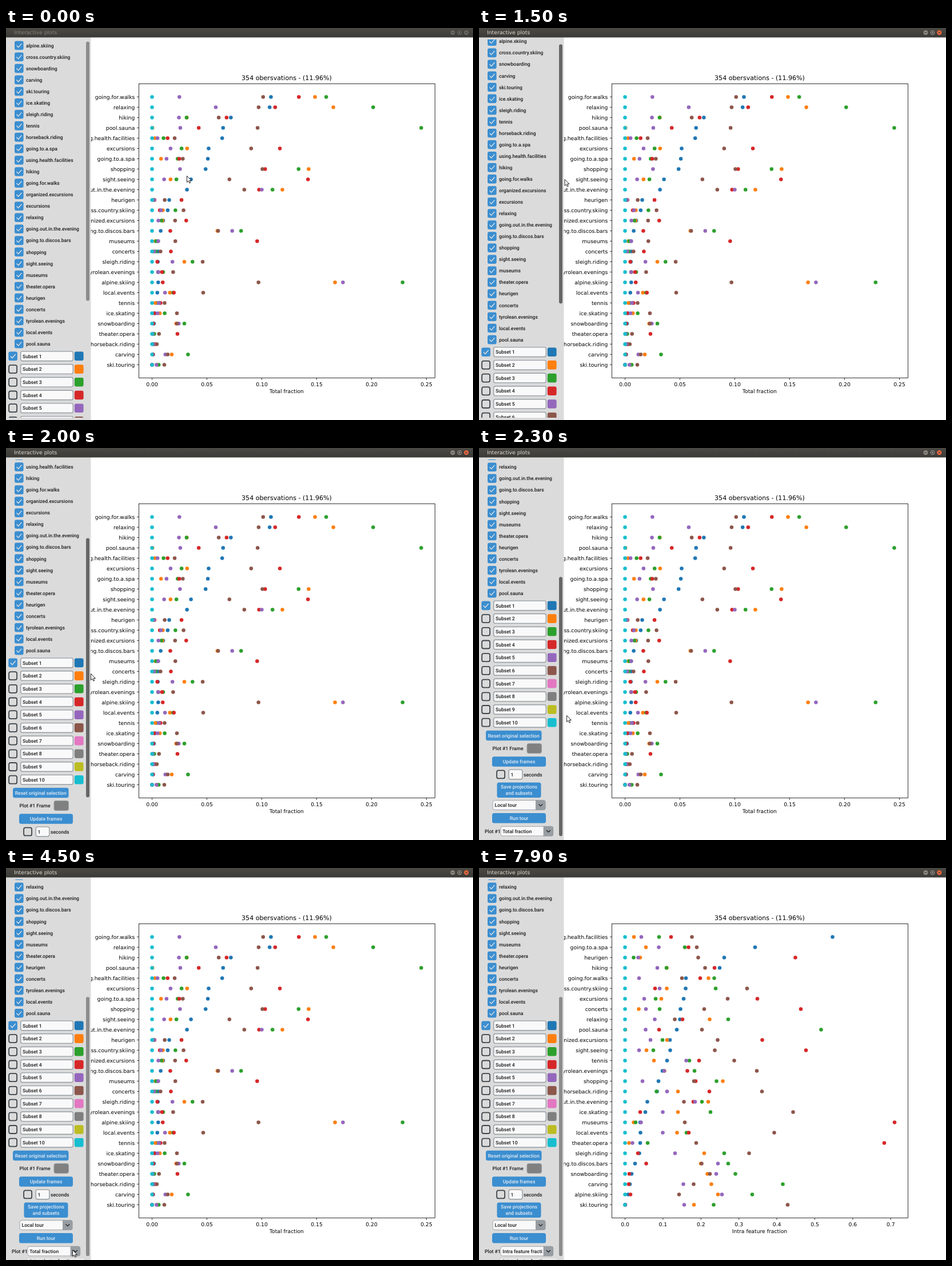
Animation of 817 by 685 pixels, one loop 8000 ms. Source, as an HTML page:

```html
<!DOCTYPE html>
<html lang="en">
<head>
<meta charset="utf-8">
<title>Interactive plots</title>
<style>
html, body { margin: 0; width: 100%; height: 100%; overflow: hidden; background: #fff; }
svg { display: block; width: 817px; height: 685px; text-rendering: geometricPrecision; }
.plot text, .title { font-family: "DejaVu Sans", sans-serif; font-size: 9.24px; }
.plot .head { font-size: 11.09px; }
.side text { font: 500 8.6px Roboto, sans-serif; fill: #1a1a1a; }
.side .light { fill: #e4ebf3; }
</style>
</head>
<body>
<svg id="stage" viewBox="0 0 817 685">
  <defs>
    <clipPath id="view"><rect x="0" y="20" width="148" height="661"/></clipPath>
    <clipPath id="field"><rect x="39" y="950" width="72" height="40"/></clipPath>
    <linearGradient id="bar" x2="0" y2="1"><stop stop-color="#4b4a45"/><stop offset="1" stop-color="#3b3a36"/></linearGradient>
  </defs>
  <rect width="817" height="685" fill="#fff"/>
  <g id="total" class="plot"></g>
  <g id="intra" class="plot"></g>
  <g class="side">
    <rect y="16" width="148.5" height="669" fill="#dbdbdb"/>
    <g clip-path="url(#view)"><g id="list"></g></g>
    <rect id="thumb" x="140" width="6" height="453" rx="3"/>
    <g id="menu">
      <rect x="36.5" y="681" width="101" height="6" fill="#e8e8e8" stroke="#c4c4c4" stroke-width=".6"/>
      <rect id="lit" x="37" y="682" width="100" height="3" fill="#bfbfbf"/>
      <text x="42" y="689.6">Intra cluster fraction</text>
    </g>
  </g>
  <g id="window">
    <rect width="817" height="16.5" fill="url(#bar)"/>
    <text id="caption" class="title" x="14" y="11.4">Interactive plots</text>
    <g id="buttons" stroke="#3b3a36">
      <circle cx="781.5" cy="8" r="4.6"/><path d="M779.3 8h4.4"/>
      <circle cx="793.5" cy="8" r="4.6"/><path d="M791.6 6.1h3.8v3.8h-3.8z" fill="none"/>
      <circle id="close" cx="805.3" cy="8" r="4.6"/><path d="M803.5 6.2l3.6 3.6m0-3.6l-3.6 3.6"/>
    </g>
  </g>
  <path id="cursor" d="M.5 .5V11.6L3.1 9.2L4.9 13.2L6.7 12.4L5 8.5H8.4z" fill="#fff" stroke="#111" stroke-width=".9"/>
</svg>
<script>
const $ = id => document.getElementById(id);
const BLUE = '#3b8ed0', GREY = '#979da2', DARK = '#3e454a', FIELD = '#f9f9fa';
const BLUE_HOVER = '#36719f', GREY_HOVER = '#6e7174';
const colors = ['#1f77b4', '#ff7f0e', '#2ca02c', '#d62728', '#9467bd', '#8c564b', '#e377c2', '#7f7f7f', '#bcbd22', '#17becf'];

function add(parent, tag, attrs, text) {
  const el = document.createElementNS('http://www.w3.org/2000/svg', tag);
  for (const k in attrs) el.setAttribute(k, attrs[k]);
  if (text) el.textContent = text;
  return parent.appendChild(el);
}

// Shares of subsets 2 to 6 per feature, in pixels; subset 1 takes the rest of UNIT.
const UNIT = 664, X0 = 255.5;
const shares = {
  'using.health.facilities': [15.5, 59.5, 80.5, 28.5, 117],
  'going.to.a.spa': [36.5, 104.5, 111, 59, 125.5],
  'heurigen': [26.5, 15, 298, 23, 128],
  'hiking': [73, 72.5, 156.5, 56.5, 140],
  'going.for.walks': [146, 156, 131.5, 24.5, 99.5],
  'cross.country.skiing': [73, 158.5, 52.5, 60.5, 213.5],
  'excursions': [63.5, 53.5, 231.5, 33.5, 179.5],
  'concerts': [24, 60.5, 307.5, 36.5, 138.5],
  'relaxing': [148, 180.5, 100.5, 52, 87],
  'pool.sauna': [.5, 343, 59.5, 36, 134.5],
  'organized.excursions': [73.5, 65.5, 240, 44.5, 162],
  'sight.seeing': [37.5, 49.5, 316.5, 24.5, 157],
  'tennis': [50.5, 112.5, 129.5, 107, 191],
  'tyrolean.evenings': [69, 121.5, 109, 68.5, 230.5],
  'shopping': [171, 160, 123.5, 30.5, 120.5],
  'horseback.riding': [92.5, 55, 147.5, 73.5, 239.5],
  'going.out.in.the.evening': [145.5, 134.5, 119.5, 122.5, 103],
  'ice.skating': [92.5, 149.5, 26.5, 66, 294],
  'museums': [15, 18.5, 471.5, 28, 104.5],
  'local.events': [91, 107.5, 111.5, 66, 261],
  'theater.opera': [7, 39.5, 453.5, 13, 124.5],
  'sleigh.riding': [138.5, 173.5, 22.5, 87.5, 217],
  'going.to.discos.bars': [132.5, 180.5, 37, 162.5, 134],
  'snowboarding': [144, 193, 7.5, 159.5, 148.5],
  'carving': [151, 276, 6.5, 102, 120],
  'alpine.skiing': [162.5, 222.5, 9.5, 169.5, 94.5],
  'ski.touring': [120.5, 155, .5, 103.5, 284.5]
};
// How far each feature's shares shrink or grow on the total scale.
const weights = {
  'going.for.walks': 1.953, 'relaxing': 2.143, 'hiking': .833, 'pool.sauna': 1.373,
  'using.health.facilities': .338, 'excursions': .966, 'going.to.a.spa': .429,
  'shopping': 1.602, 'sight.seeing': .862, 'going.out.in.the.evening': 1.567,
  'heurigen': .173, 'cross.country.skiing': .258, 'organized.excursions': .249,
  'going.to.discos.bars': .863, 'museums': .39, 'concerts': .107, 'sleigh.riding': .408,
  'tyrolean.evenings': .16, 'alpine.skiing': 1.97, 'local.events': .343, 'tennis': .115,
  'ice.skating': .148, 'snowboarding': .293, 'theater.opera': .098,
  'horseback.riding': .035, 'carving': .228, 'ski.touring': .0755
};

function drawPlot(g, names, weight, label, ticks) {
  add(g, 'rect', { x: 232.5, y: 97.5, width: 518, height: 514, fill: 'none', stroke: '#000', 'stroke-width': .8 });
  add(g, 'text', { class: 'head', x: 491, y: 91.4, 'text-anchor': 'middle' }, '354 obersvations - (11.96%)');
  add(g, 'text', { x: 491, y: 638.2, 'text-anchor': 'middle' }, label);
  for (let i = 0; i < ticks.count; i++) {
    const x = X0 + i * ticks.gap;
    add(g, 'path', { d: `M${x} 611.5v3.4`, stroke: '#000', 'stroke-width': .8 });
    add(g, 'text', { x, y: 625.6, 'text-anchor': 'middle' }, (i * ticks.step).toFixed(ticks.digits));
  }
  names.forEach((name, i) => {
    const y = 120.4 + 18 * i, rest = shares[name];
    const first = UNIT - rest.reduce((a, b) => a + b);
    add(g, 'path', { d: `M232.5 ${y}h-3.4`, stroke: '#000', 'stroke-width': .8 });
    add(g, 'text', { x: 225.3, y: y + 3.5, 'text-anchor': 'end' }, name);
    [first, ...rest].forEach((v, k) =>
      add(g, 'circle', { cx: X0 + v * weight(name), cy: y, r: 3.25, fill: colors[k] }));
    add(g, 'circle', { cx: X0, cy: y, r: 3.25, fill: colors[9] });
  });
}
drawPlot($('total'), Object.keys(weights), n => weights[n], 'Total fraction', { count: 6, gap: 96, step: .05, digits: 2 });
drawPlot($('intra'), Object.keys(shares), () => 1, 'Intra feature fraction', { count: 8, gap: 66.4, step: .1, digits: 1 });

// Side panel widgets, placed by left edge and vertical centre
const list = $('list');
const label = (x, y, text, attrs) => add(list, 'text', { x, y: y + 3.1, ...attrs }, text);
const box = (x, y, width, height, fill, rx = 3) => add(list, 'rect', { x, y: y - height / 2, width, height, rx, fill });
function check(x, y, on) {
  if (!on) return add(list, 'rect', { x: x + .8, y: y - 7, width: 14, height: 14, rx: 3, fill: 'none', stroke: DARK, 'stroke-width': 1.8 });
  box(x, y, 15.6, 15.6, BLUE);
  add(list, 'path', { d: `M${x + 3.8} ${y + .4}l2.8 2.9l5.4-6.2`, fill: 'none', stroke: '#e5e5e5', 'stroke-width': 1.3, 'stroke-linecap': 'round' });
}
const entry = (x, y, width, text) => {
  add(list, 'rect', { x: x + .7, y: y - 8.3, width: width - 1.4, height: 16.6, rx: 3, fill: FIELD, stroke: GREY, 'stroke-width': 1.4 });
  label(x + 4, y, text);
};
function button(x, y, width, lines, height = 17.6) {
  const r = box(x, y, width, height, BLUE, 3.5);
  lines.forEach((text, i) =>
    label(x + width / 2, y + (i - (lines.length - 1) / 2) * 11, text, { class: 'light', 'text-anchor': 'middle' }));
  return r;
}
function option(x, y, width, text, attrs) {
  box(x, y, width, 17.6, FIELD, 3.5);
  const right = x + width, top = y - 8.8;
  const arrow = add(list, 'path', { d: `M${right - 17.5} ${top}h14a3.5 3.5 0 0 1 3.5 3.5v10.6a3.5 3.5 0 0 1-3.5 3.5h-14z`, fill: GREY });
  add(list, 'rect', { x: x + .5, y: top + .5, width: width - 1, height: 16.6, rx: 3.2, fill: 'none', stroke: GREY });
  add(list, 'path', { d: `M${right - 11.8} ${y - 1.4}l3.1 3l3.1-3`, fill: 'none', stroke: '#1a1a1a', 'stroke-width': 1.2, 'stroke-linecap': 'round' });
  return { arrow, text: label(x + 4, y, text, attrs) };
}

['alpine.skiing', 'cross.country.skiing', 'snowboarding', 'carving', 'ski.touring', 'ice.skating', 'sleigh.riding',
  'tennis', 'horseback.riding', 'going.to.a.spa', 'using.health.facilities', 'hiking', 'going.for.walks',
  'organized.excursions', 'excursions', 'relaxing', 'going.out.in.the.evening', 'going.to.discos.bars', 'shopping',
  'sight.seeing', 'museums', 'theater.opera', 'heurigen', 'concerts', 'tyrolean.evenings', 'local.events', 'pool.sauna'
].forEach((name, i) => {
  const y = 30.5 + 20.05 * i;
  check(15, y, true);
  label(35, y, name);
});
colors.forEach((c, i) => {
  const y = 573.4 + 22.7 * i;
  check(4.3, y, i === 0);
  entry(25, y, 93, 'Subset ' + (i + 1));
  box(119.8, y, 15.8, 15.6, c);
});
button(12, 800.5, 97.5, ['Reset original selection']);
label(23.5, 823, 'Plot #1 Frame');
add(list, 'rect', { x: 84, y: 814.6, width: 25.4, height: 16.8, rx: 3, fill: '#808080', stroke: GREY });
button(23, 846, 94, ['Update frames']);
check(30.3, 868.4, false);
entry(51.5, 868.4, 25, '1');
label(78, 868.4, 'seconds');
button(31.5, 895.8, 77, ['Save projections', 'and subsets'], 26.5);
const tour = option(23.5, 922, 93, 'Local tour');
const run = button(23, 944.8, 94, ['Run tour']);
label(10, 967.6, 'Plot #1');
const kind = option(37.3, 967.6, 92.8, 'Total fraction', { 'clip-path': 'url(#field)' });

// Piecewise linear motion through [time, ...values]
function along(points, t) {
  let i = points.findIndex(p => p[0] > t);
  if (i < 0) return points[points.length - 1].slice(1);
  const a = points[i - 1], b = points[i], k = (t - a[0]) / (b[0] - a[0]);
  return a.slice(1).map((v, j) => v + (b[j + 1] - v) * k);
}
const pointer = [
  [0, 316, 258], [500, 215, 262], [800, 131, 265], [900, 142, 263], [1300, 142, 263], [1500, 149.5, 264],
  [1600, 149, 280], [2000, 148, 394], [2300, 153, 467], [2400, 155, 477], [2800, 155, 477], [2900, 70, 644],
  [3000, 70, 644], [3300, 106, 624], [3500, 110, 640], [3800, 118, 669], [4400, 118, 669], [4500, 116, 667],
  [5300, 117, 668], [6800, 118, 664], [7500, 118, 664], [7600, 117, 666], [7800, 119, 670]
];
const scroll = [[0, 0], [1300, 0], [1500, 7.2], [1600, 30], [2000, 198], [2300, 298]];

const within = (t, ...spans) => spans.some(([a, b]) => t >= a && t < b);
const show = (el, on) => el.setAttribute('display', on ? 'inline' : 'none');
const fill = (el, color) => el.setAttribute('fill', color);

function draw(time) {
  const t = Math.floor(time / 100) * 100;
  const active = t >= 1300, changed = t >= 6500;
  const [y] = along(scroll, t), [cx, cy] = along(pointer, t);
  list.setAttribute('transform', `translate(0 ${-y})`);
  $('thumb').setAttribute('y', 23.7 + y * .676);
  fill($('thumb'), within(t, [900, 2400]) ? '#666' : '#8c8c8c');
  $('cursor').setAttribute('transform', `translate(${cx} ${cy})`);
  show($('cursor'), within(t, [0, 4800], [5300, 5400], [6800, 7900]));
  fill($('caption'), active ? '#dfdbd2' : '#87847d');
  fill($('buttons'), active ? '#8b8981' : '#6b6963');
  fill($('close'), active ? '#ee6a40' : '#6b6963');
  fill(run, within(t, [2900, 3200], [3500, 3700]) ? BLUE_HOVER : BLUE);
  fill(tour.arrow, within(t, [3300, 3500]) ? GREY_HOVER : GREY);
  fill(kind.arrow, within(t, [3800, 4500], [6800, 7500]) ? GREY_HOVER : GREY);
  kind.text.textContent = t >= 6400 ? 'Intra feature fraction' : 'Total fraction';
  show($('menu'), within(t, [4500, 6200], [7600, 8000]));
  show($('lit'), within(t, [5300, 5700]));
  show($('total'), !changed);
  show($('intra'), changed);
}

const start = performance.now();
function tick() {
  draw((performance.now() - start) % 8000);
  requestAnimationFrame(tick);
}
tick();
</script>
</body>
</html>
```
